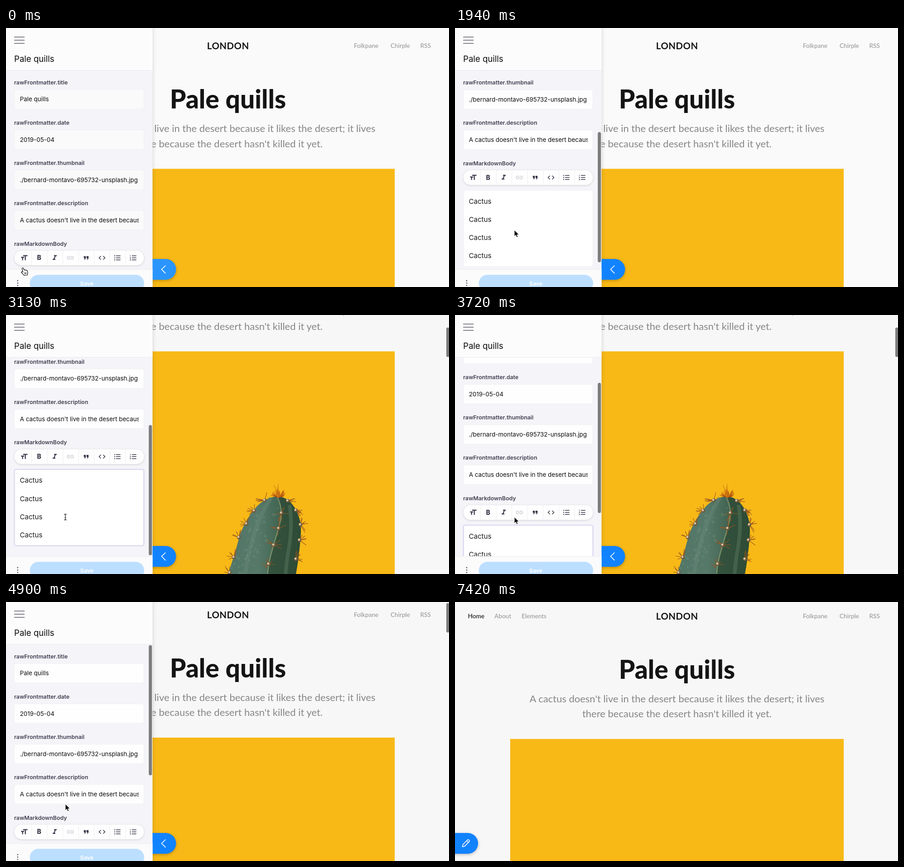
An HTML page for the animation above (7.87 s loop, 978x573 px).

```html
<!DOCTYPE html>
<html lang="en">
<head>
<meta charset="utf-8">
<title>Editor sidebar</title>
<style>
html, body { margin: 0; width: 100%; height: 100%; overflow: hidden; background: #fafafa; }
svg { display: block; width: 100vw; height: 100vh; }
text { white-space: pre; }
.site { font-family: Lato, Mulish, sans-serif; }
.ui { font-family: Inter, sans-serif; }
.nav { font-size: 13.6px; font-weight: 500; fill: #999; }
.lead { font-size: 22px; fill: #868686; }
.label { font-size: 12.4px; font-weight: 600; fill: #433e52; }
.value { font-size: 13.4px; fill: #0c0c0e; }
.para { font-size: 15.1px; fill: #1b1b1e; }
</style>
</head>
<body>
<svg id="stage" viewBox="0 0 978 573" preserveAspectRatio="none"></svg>
<script>
const LOOP = 7870;
const MAX_SCROLL = 195.3;
const PANEL_W = 324.5;
const EDGE = 323.5;
const STEP = 150;
const TITLE = 'Pale quills';
// Spans in which the picture moves; it rests in between.
const SPANS = [[600, 1040], [1640, 2240], [2530, 3130], [3430, 4460],
  [4600, 5500], [5650, 5800], [6240, 6830], [7120, 7420]];

const text = (x, y, cls, str, extra = '') =>
  `<text x="${x}" y="${y}" class="${cls}" ${extra}>${str}</text>`;
const rect = (x, y, w, h, fill, extra = '') =>
  `<rect x="${x}" y="${y}" width="${w}" height="${h}" fill="${fill}" ${extra}/>`;
const line = (d, color, width, extra = '') =>
  `<path d="${d}" fill="none" stroke="${color}" stroke-width="${width}" ${extra}/>`;

function seeded(seed) {
  return () => (seed = seed * 16807 % 2147483647) / 2147483647;
}

function spines(x, y, count, from, to, len, color, rnd) {
  let d = '';
  for (let i = 0; i < count; i++) {
    const a = (from + (to - from) * rnd()) * Math.PI / 180;
    const r = len * (0.45 + 0.55 * rnd());
    d += `M${x} ${y}l${(Math.cos(a) * r).toFixed(1)} ${(Math.sin(a) * r).toFixed(1)}`;
  }
  return line(d, color, 1.1);
}

function cactus() {
  const rnd = seeded(77);
  const body = 'M440 800 Q462 660 490 573 Q505 530 514 495 Q524 460 546 433 Q566 405 598 401 ' +
    'Q622 402 637 426 Q652 450 651 480 Q648 530 640 573 Q630 680 640 800Z';
  const ridge = 'Q607 418 608 438 Q606 458 602 472 Q596 490 591 509 Q584 530 580 552 Q572 620 560 800';
  const groups = [
    { at: [[571, 410], [548, 433], [531, 462], [514, 492], [503, 536], [494, 570]], arc: [140, 300] },
    { at: [[608, 438], [602, 472], [591, 509], [580, 551], [575, 590]], arc: [0, 360] },
    { at: [[622, 411], [640, 432], [650, 464], [648, 498], [640, 540]], arc: [-90, 60] }
  ];
  let s = `<path d="${body}" fill="url(#green)"/>` +
    `<path d="M598 401${ridge} L640 800 Q630 680 640 573 Q648 530 651 480 Q652 450 637 426 Q622 402 598 401Z" fill="#2c4a34" opacity=".75"/>` +
    line('M585 404 Q555 450 538 520 Q520 590 505 800', '#6d8a78', 9, 'opacity=".4"') +
    line('M626 420 Q634 470 622 530 Q612 600 606 800', '#54745a', 8, 'opacity=".55"') +
    line('M598 401' + ridge, '#85996f', 2.5, 'opacity=".8"');
  let mottle = '';
  for (let i = 0; i < 60; i++) {
    const y = 425 + 150 * rnd(), x = 590 - (y - 400) * 0.5 + (rnd() - 0.3) * 50;
    mottle += `<circle cx="${x.toFixed(1)}" cy="${y.toFixed(1)}" r="${(1 + 2.5 * rnd()).toFixed(1)}"/>`;
  }
  s += `<g clip-path="url(#cactusClip)" fill="#86a38f" opacity=".22">${mottle}</g>`;
  for (const g of groups) for (const [x, y] of g.at) {
    s += spines(x, y, 7, ...g.arc, 20, '#9b561f', rnd) +
      `<circle cx="${x}" cy="${y}" r="4.2" fill="#6f5a3e"/><circle cx="${x - 1}" cy="${y - 1}" r="2.4" fill="#d9c4a2"/>`;
  }
  s += spines(602, 404, 34, -165, -15, 19, '#b4500f', rnd) +
    spines(602, 403, 8, -150, -40, 30, '#cf7a12', rnd);
  return `<clipPath id="cactusClip"><path d="${body}"/></clipPath><g transform="translate(0 231)">${s}</g>`;
}

function page() {
  const mid = 'text-anchor="middle"';
  const links = [[28.5, 'Home'], [87, 'About'], [147, 'Elements'], [768, 'Folkpane'], [849, 'Chirple'], [914.5, 'RSS']];
  return links.map(([x, s], i) => text(x, 44, 'site nav', s, i ? '' : 'style="fill:#111"')).join('') +
    text(490.3, 47, 'site', 'LONDON', mid + ' font-size="20.4" font-weight="700" letter-spacing=".5" fill="#141414"') +
    text(490, 178, 'site', TITLE, mid + ' font-size="57" font-weight="800" fill="#141414"') +
    text(490, 230, 'site lead', "A cactus doesn't live in the desert because it likes the desert; it lives", mid) +
    text(490, 263.5, 'site lead', "there because the desert hasn't killed it yet.", mid) +
    rect(121.8, 311.5, 736.4, 900, '#f8b917') + cactus();
}

function toolbar() {
  const ink = '#3a3648';
  const stripes = 'M8 6H21M8 12H21M8 18H21';
  const icons = [
    `<path d="M9 4v3h5v12h3V7h5V4H9zm-6 8h3v7h3v-7h3V9H3v3z" fill="${ink}"/>`,
    text(12, 18.5, 'ui', 'B', `font-size="18.5" font-weight="800" text-anchor="middle" fill="${ink}"`),
    `<path d="M10 4v3h2.2l-3.4 8H6v3h8v-3h-2.2l3.4-8H18V4z" fill="${ink}"/>`,
    line('M11 8H7a4 4 0 0 0 0 8h4M13 8h4a4 4 0 0 1 0 8h-4M8 12h8', '#cfcdd6', 2),
    `<path d="M6 17h3l2-4V7H5v6h3zm8 0h3l2-4V7h-6v6h3z" fill="${ink}"/>`,
    line('M8.7 6.7L3.4 12l5.3 5.3M15.3 6.7l5.3 5.3-5.3 5.3', ink, 2),
    line(stripes, ink, 2) + line('M2.8 6h2.6M2.8 12h2.6M2.8 18h2.6', ink, 2.6),
    line(stripes, ink, 2) + line('M2 4.5h1.5V8M2 10.5h2.5L2.3 13.5H5M2 16.5h2.5v3H2M3 18h1.5', ink, 1)
  ];
  const xs = [40, 73, 107.5, 142, 177, 212, 246, 281];
  let s = rect(18.5, 492.5, 286, 32.5, '#fefefe', 'rx="16.2" style="filter:drop-shadow(0 1.5px 2px #00000028)"');
  for (let i = 0; i < 7; i++) s += rect(55.8 + i * 34.6, 493, 1, 31.5, '#eeedf1');
  icons.forEach((d, i) => {
    s += `<g transform="translate(${xs[i]} 508.5) scale(.75) translate(-12 -12)">${d}</g>`;
  });
  return s;
}

function form() {
  const fields = [['title', TITLE], ['date', '2019-05-04'],
    ['thumbnail', './bernard-montavo-695732-unsplash.jpg'],
    ['description', "A cactus doesn't live in the desert because it likes the desert"]];
  let s = '';
  fields.forEach(([name, val], i) => {
    const y = i * 89.25;
    s += text(18, 124.5 + y, 'ui label', 'rawFrontmatter.' + name) +
      rect(18.5, 136 + y, 286, 43, '#fff', 'class="box" rx="4" stroke="#efeef3"') +
      `<g clip-path="url(#valueClip)">${text(30.7, 162.3 + y, 'ui value', val)}</g>`;
  });
  s += text(18, 481.5, 'ui label', 'rawMarkdownBody') + toolbar() +
    rect(18.5, 536.8, 286, 169, '#fff', 'id="area" rx="4"');
  for (let i = 0; i < 4; i++) s += text(30.5, 566.8 + i * 40.1, 'ui para', 'Cactus');
  return s;
}

function panel() {
  let dots = '';
  for (const y of [559, 564.3, 569.6]) dots += `<circle cx="25.8" cy="${y}" r="1.4" fill="#5d5a68"/>`;
  return rect(EDGE, 0, 8, 573, 'url(#shade)', 'id="edge"') +
    `<g id="tab"><path d="M318 511H352.5a23 23 0 0 1 0 46H318Z" style="filter:drop-shadow(0 2px 3px #00000040)"/></g>` +
    line('M352.3 525.5L343.5 534l8.8 8.8', '#fff', 1.7, 'id="chevron"') +
    `<g id="pencil" transform="translate(348.3 534) rotate(45)">${line('M-2.7 -7.5a2.7 2.7 0 0 1 5.4 0V6.3L0 10.6L-2.7 6.3ZM-2.7 -5.2H2.7', '#fff', 1.6, 'stroke-linejoin="round"')}</g>` +
    rect(0, 0, EDGE, 573, '#f5f5f9') +
    `<g clip-path="url(#bodyClip)"><g id="form">${form()}</g></g>` +
    rect(0, 0, EDGE, 93.5, '#fcfcfc') + rect(0, 93, EDGE, 1, '#ebebee') +
    rect(0, 534, EDGE, 39, '#fbfbfc') + rect(0, 533.5, EDGE, 1, '#ebebee') +
    line('M18 20H41M18 27H41M18 34H41', '#5f5c6a', 1.6) +
    text(18, 75.2, 'ui', TITLE, 'font-size="18.6" fill="#0c0c0e"') +
    dots + rect(52.5, 546, 252.5, 38, '#bddfff', 'rx="19"') +
    text(178.5, 569.5, 'ui', 'Save', 'text-anchor="middle" font-size="12.4" font-weight="600" fill="#fff"') +
    rect(315.2, 95.5, 7, 288, '#7c7c7c', 'id="panelBar" rx="3.5"');
}

const cursors =
  `<path id="arrow" d="M0 0V14L3.2 11.1L5.4 16.1L7.9 15L5.8 10.2H10.2Z" fill="#000" stroke="#fff" stroke-width="1"/>` +
  `<g id="hand"><path transform="translate(-4 -1.5) scale(1.08)" d="M2.2 2.6Q2.8 .6 4.6 1.4Q5.4 2 6.4 5.4Q7.8 4.6 8.8 5.8Q10.2 5 11.2 6.4Q13 6 13.4 8L13.8 11.5Q13.6 13.5 12.8 16L6.4 16.4Q4 12.8 1 10.8Q.2 8.6 2.6 9L4 9.8ZM7.6 10.5L8.2 14M10 10.2L10.4 13.6" fill="#fff" stroke="#000" stroke-width="1.1" stroke-linejoin="round"/></g>` +
  `<g id="beam">${line('M-3 -6.5Q0 -6.5 0 -5V5Q0 6.5 -3 6.5M3 -6.5Q0 -6.5 0 -5M0 5Q0 6.5 3 6.5M-1.5 1.5H1.5', '#111', 1.2)}</g>`;

const clip = (id, x, y, w, h) => `<clipPath id="${id}">${rect(x, y, w, h, '#000')}</clipPath>`;

document.getElementById('stage').innerHTML =
  `<defs>${clip('bodyClip', 0, 94, EDGE, 440)}${clip('valueClip', 18, 0, 275, 700)}
  <linearGradient id="shade"><stop stop-color="#000" stop-opacity=".13"/><stop offset=".3" stop-color="#000" stop-opacity=".04"/><stop offset="1" stop-color="#000" stop-opacity=".01"/></linearGradient>
  <linearGradient id="green"><stop stop-color="#4e7263"/><stop offset=".55" stop-color="#56796a"/><stop offset="1" stop-color="#2f4f38"/></linearGradient></defs>` +
  rect(0, 0, 978, 573, '#fafafa', 'id="paper"') + `<g id="page">${page()}</g>` +
  rect(972, 1.3, 7, 65, '#7c7c7c', 'id="pageBar" rx="3"') +
  `<g id="panel">${panel()}</g><g id="cursor">${cursors}</g>`;

const el = {};
document.querySelectorAll('#stage [id]').forEach(n => el[n.id] = n);
const boxes = document.querySelectorAll('.box');

// Time of the latest change of the picture.
function held(t) {
  let last = 0;
  for (const [a, b] of SPANS) {
    if (t < a) break;
    last = t >= b ? b : Math.max(a, b - Math.ceil((b - t) / STEP) * STEP);
  }
  return last;
}

// Each move is [start, end, value], eased at both ends.
function track(t, v, ...moves) {
  for (const [a, b, to] of moves) {
    const p = Math.min(1, Math.max(0, (t - a) / (b - a)));
    v += (to - v) * p * p * (3 - 2 * p);
  }
  return v;
}

const within = (t, a, b) => t >= a && t < b;
const show = (node, on) => node.setAttribute('visibility', on ? 'visible' : 'hidden');
const move = (node, x, y) => node.setAttribute('transform', `translate(${x.toFixed(2)} ${y.toFixed(2)})`);

function render(time) {
  const t = held(time);
  const form = track(t, 0, [1490, 2042, MAX_SCROLL], [3280, 4010, 0]);
  const scroll = track(t, 0, [2380, 3130, 231], [3987, 4967, 8.5]);
  const slide = track(t, 0, [6145, 6445, 1]);
  const x = track(t, 37, [450, 1040, 131], [4950, 5500, 328], [5500, 5800, 357], [6240, 6830, 847], [6970, 7420, 945]);
  const y = track(t, 531, [450, 1040, 447], [4950, 5500, 510], [5500, 5800, 547], [6240, 6830, 521], [6970, 7420, 580]);

  el.paper.setAttribute('fill', t < 2530 ? '#fafafa' : '#f7f7f7');
  move(el.page, 0, -scroll);
  move(el.pageBar, 0, scroll * 0.1145);
  show(el.pageBar, within(t, 2530, 5650));

  move(el.panel, -PANEL_W * slide, 0);
  move(el.form, 0, -form);
  move(el.panelBar, 0, form * 0.758);
  show(el.panelBar, within(t, 1640, 5050));
  el.edge.setAttribute('opacity', 1 - slide);
  boxes.forEach(b => b.setAttribute('fill', within(t, 600, 5800) ? '#fefefe' : '#fafafa'));

  const focus = t >= 2240;
  el.area.setAttribute('stroke', focus ? '#dedaf1' : '#efeef3');
  el.area.setAttribute('stroke-width', focus ? 2.6 : 1);

  el.tab.setAttribute('fill', t < 600 ? '#2a95fd' : within(t, 5650, 6380) ? '#1374ea' : '#1283ff');
  show(el.chevron, t < 6240);
  show(el.pencil, t >= 6240);

  const hand = t < 740 || within(t, 5650, 6380);
  const beam = within(t, 2240, 3560);
  show(el.hand, hand);
  show(el.beam, beam);
  show(el.arrow, !hand && !beam);
  move(el.cursor, x, y);
}

const start = performance.now();
function tick() {
  render((performance.now() - start) % LOOP);
  requestAnimationFrame(tick);
}
tick();
</script>
</body>
</html>
```
